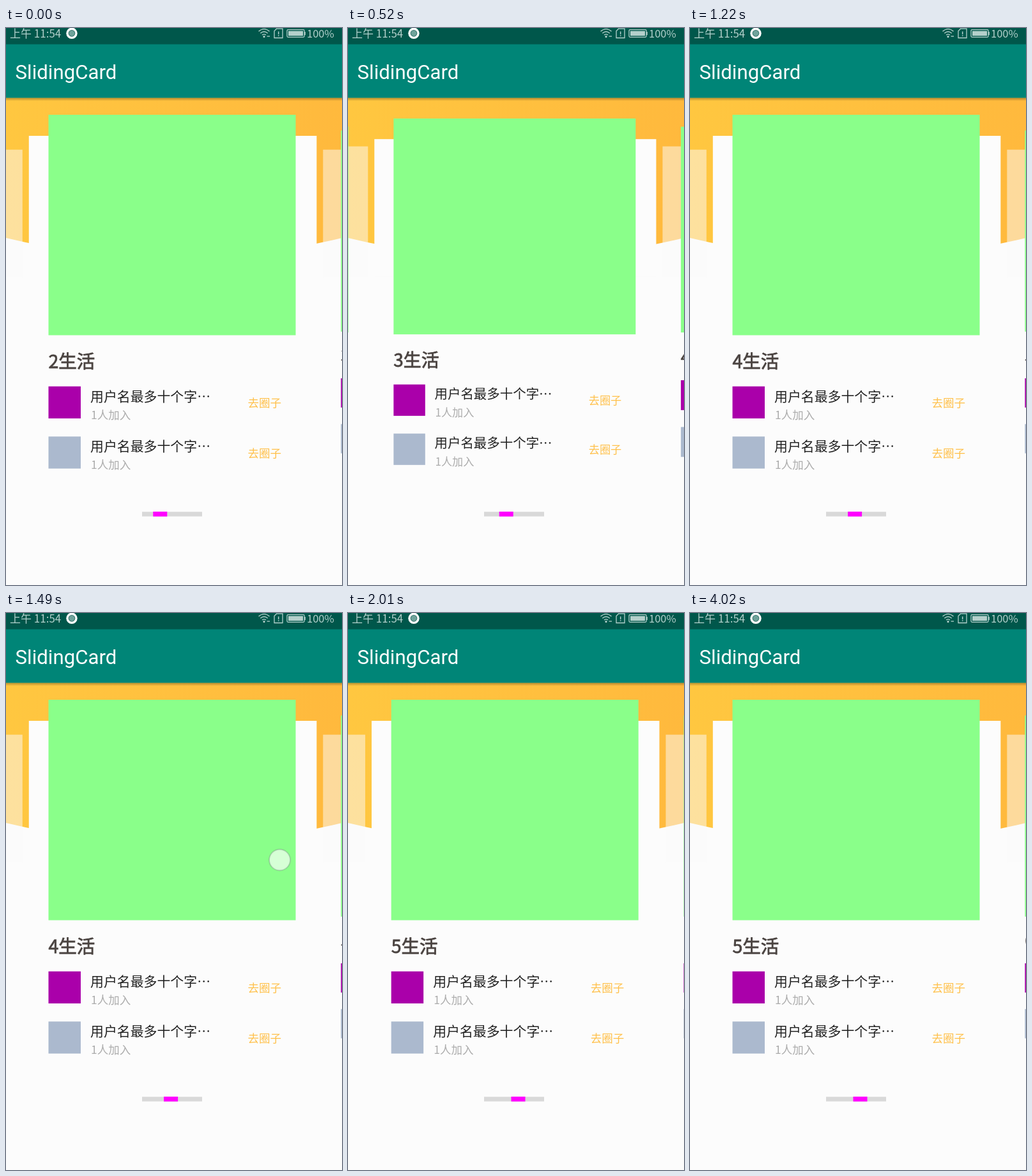
An HTML page that plays this animation: 526 by 873 pixels, repeating every 4090 ms.

```html
<!DOCTYPE html>
<html lang="zh-CN">
<head>
<meta charset="utf-8">
<title>SlidingCard</title>
<style>
html, body { margin: 0; width: 526px; height: 873px; overflow: hidden; background: #fcfcfc; }
svg { display: block; font-family: "Noto Sans CJK SC", "Noto Sans CJK", "Noto Sans CJK JP", "Noto Sans", sans-serif; }
.status { fill: #b4d0cb; }
.bar { font: 400 31.2px Roboto, "Noto Sans", sans-serif; fill: #fff; }
.head { font-size: 28.5px; fill: #4a4340; stroke: #4a4340; stroke-width: .8px; }
.user { font-size: 20.9px; fill: #222; }
.count { font-size: 17.5px; fill: #acacac; }
.go { font-size: 17.5px; fill: #ffc04a; }
</style>
</head>
<body>
<svg id="stage" width="526" height="873" viewBox="0 0 526 873">
  <defs>
    <linearGradient id="sun"><stop stop-color="#ffc740"/><stop offset="1" stop-color="#ffb93d"/></linearGradient>
    <linearGradient id="shade" x2="0" y2="1"><stop stop-opacity=".28"/><stop offset="1" stop-opacity="0"/></linearGradient>
  </defs>
  <rect width="526" height="873" fill="#fcfcfc"/>
  <path d="M0 109H526V329Q263 393 0 329Z" fill="url(#sun)"/>
  <g id="cards"></g>
  <rect x="213" y="758.3" width="94" height="7.2" fill="#d9d9d9"/>
  <rect id="thumb" y="758" width="22" height="7.6" fill="#f0f"/>

  <rect y="109.5" width="526" height="5" fill="url(#shade)"/>
  <rect y="25" width="526" height="84.5" fill="#008577"/>
  <rect width="526" height="25.5" fill="#00574b"/>
  <text class="bar" x="14.6" y="80.3">SlidingCard</text>
  <g class="status">
    <text x="6" y="15" font-size="17">上午 11:54</text>
    <text x="471" y="15" font-size="16.5">100%</text>
    <rect x="442" y="4.7" width="23" height="7.6"/>
    <rect x="467" y="6" width="1.8" height="5"/>
    <rect x="425.9" y="5.5" width="1.5" height="4.5"/>
    <rect x="425.9" y="11.2" width="1.5" height="1.6"/>
    <circle cx="404" cy="13.6" r="1.6"/>
    <g fill="none" stroke="#b4d0cb" stroke-width="1.3">
      <rect x="440" y="2.7" width="27" height="11.6" rx="1.5"/>
      <path d="M423.5 1.2H433V15.5H420V4.8Z"/>
      <path d="M395.5 5.3Q404 -2 412.5 5.3M398.3 8.2Q404 3.2 409.7 8.2M401 11Q404 8.6 407 11"/>
      <path d="M408.5 13H413"/>
    </g>
  </g>
  <circle cx="103" cy="8.3" r="8.7" fill="#fff"/>
  <circle cx="103" cy="8.3" r="4.8" fill="#6fa39b" stroke="#3d7c73" stroke-width="1.2"/>
  <circle id="dot" r="16.5" fill="#fff" fill-opacity=".65" stroke="#789682" stroke-opacity=".4" stroke-width="2"/>
</svg>
<script>
const LOOP = 4090, TICK = 133.5, TICK_LEAD = 16;
const PAGE = 440.8, PIVOT_X = 261, PIVOT_Y = 417, SMALL = 0.9125;
const FIRST_PAGE = 2;
const HOLD = 230, DRAG = 200, GROW = 250;   // ms
const DRAGGED = 0.644;                      // share of a page moved by the finger

// Each swipe lets go at `release`, selects the next page and settles.
const swipes = [
  { release: 365, settle: 260 },
  { release: 934, settle: 260 },
  { release: 1690, settle: 500 },
];

const cardsBox = document.getElementById('cards');
const thumb = document.getElementById('thumb');
const dot = document.getElementById('dot');

const clamp = v => Math.max(0, Math.min(1, v));
const mix = (a, b, k) => a + (b - a) * k;
const easeInOut = k => (1 - Math.cos(Math.PI * k)) / 2;

const row = (y, color) => `
  <rect x="66.5" y="${y}" width="50.5" height="50.2" fill="${color}"/>
  <text class="user" x="132" y="${y + 22.8}">用户名最多十个字…</text>
  <text class="count" x="133" y="${y + 51}">1人加入</text>
  <text class="go" x="378.5" y="${y + 32.4}">去圈子</text>`;

function makeCard(page) {
  const g = document.createElementNS('http://www.w3.org/2000/svg', 'g');
  g.innerHTML = `
    <rect class="panel" x="35.8" y="169" width="450.5" height="220" fill="#fcfcfc"/>
    <rect x="66.5" y="136" width="387" height="345.5" fill="#8aff8a"/>
    <text class="head" x="66.5" y="533.3">${page}生活</text>
    ${row(561.7, '#a0a')}${row(640.3, '#abb9ce')}`;
  cardsBox.append(g);
  return { page, g, panel: g.querySelector('.panel') };
}
const cards = Array.from({ length: 6 }, (_, i) => makeCard(i + 1));

const dragAt = (s, t) => clamp((t - s.release + DRAG) / DRAG) ** 2;

function moved(s, t) {
  if (t < s.release) return DRAGGED * dragAt(s, t);
  return 1 - (1 - DRAGGED) * (1 - clamp((t - s.release) / s.settle)) ** 5;
}

function draw(t) {
  const pos = swipes.reduce((sum, s) => sum + moved(s, t), FIRST_PAGE);
  const done = swipes.filter(s => s.release <= t);
  const current = FIRST_PAGE + done.length;
  const grown = done.length ? easeInOut(clamp((t - done.at(-1).release) / GROW)) : 1;

  for (const { page, g, panel } of cards) {
    const active = page === current;
    const size = mix(SMALL, 1, active ? grown : 1 - grown);
    const x = PIVOT_X + (page - pos) * PAGE;
    g.setAttribute('transform', `translate(${x} ${PIVOT_Y}) scale(${size}) translate(${-PIVOT_X} ${-PIVOT_Y})`);
    panel.setAttribute('fill-opacity', active ? 1 : 0.5);
  }
  thumb.setAttribute('x', 213.5 + 8.4 * (current - 1 + grown));

  const touch = swipes.find(s => t >= s.release - HOLD && t < s.release + 20);
  dot.style.display = touch ? '' : 'none';
  if (touch) {
    const k = dragAt(touch, t);
    dot.setAttribute('cx', mix(428.5, 267, k));
    dot.setAttribute('cy', mix(387, 417, k));
    dot.setAttribute('opacity', mix(1, 0.65, k));
  }
}

const start = performance.now();
function frame() {
  const t = (performance.now() - start) % LOOP;
  draw(Math.floor((t + TICK_LEAD) / TICK) * TICK);
  requestAnimationFrame(frame);
}
frame();
</script>
</body>
</html>
```
